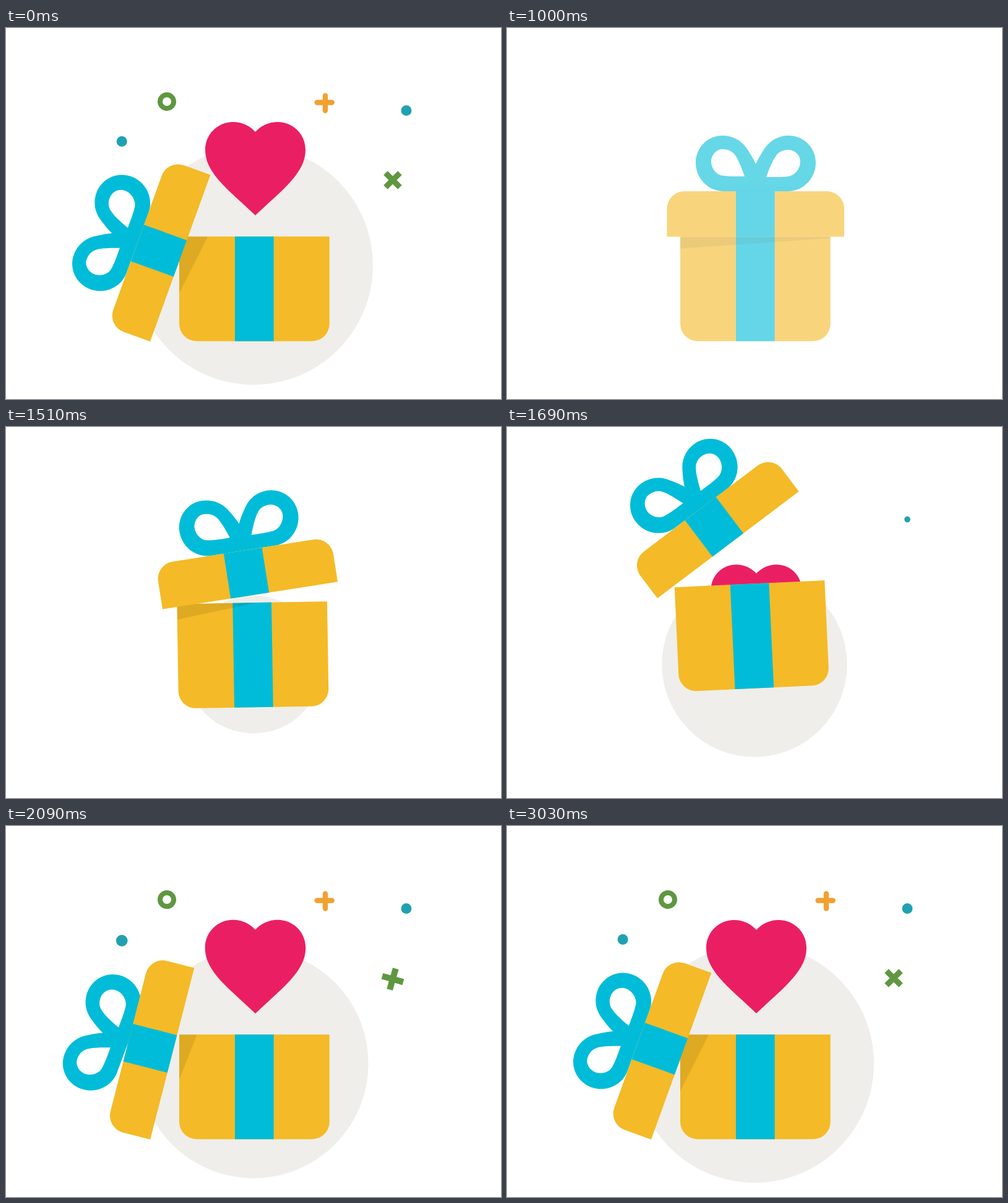
Recreate the animation shown at these times as an HTML page. Size 800 px wide and 600 px high, loop 3630 ms.

```html
<!DOCTYPE html>
<html lang="en">
<head>
<meta charset="utf-8">
<title>Gift</title>
<style>
html, body { margin: 0; width: 100%; height: 100%; overflow: hidden; background: #fff; }
svg { display: block; width: 100%; height: 100%; }
</style>
</head>
<body>
<svg viewBox="0 0 800 600">
  <defs>
    <path id="crate" d="M280 337.3H522.7V478.5A28 28 0 0 1 494.7 506.5H308A28 28 0 0 1 280 478.5Z"/>
    <clipPath id="inside"><use href="#crate"/></clipPath>
  </defs>
  <g id="scene">
    <circle id="disc" cx="400" cy="384" fill="#efeeea"/>
    <path id="heart" fill="#ea1f63" d="M403 168C394 158 381 152 367 152C342 152 322 172 322 197C322 235 360 262 403 303C446 262 484 235 484 197C484 172 464 152 439 152C425 152 412 158 403 168Z"/>
    <g id="box">
      <use href="#crate" fill="#f4ba27"/>
      <path fill="#00bcd8" d="M370 337.3H432.7V506.5H370Z"/>
      <path id="shade" clip-path="url(#inside)" fill-opacity=".09"/>
    </g>
    <circle id="dotL" r="8.5" fill="#20a1b2"/>
    <circle id="dotR" r="8.5" fill="#20a1b2"/>
    <circle id="ring" fill="none" stroke="#5f9741"/>
    <path id="plus" fill="none" stroke="#f0a131" stroke-width="8.4" stroke-linecap="round" d="M1 -11.5V12.5M-12.3 -.5H11.7"/>
    <path id="cross" fill="none" stroke="#5f9741" stroke-width="9.2" d="M-11.5 -11.5L11.5 11.5M11.5 -11.5L-11.5 11.5"/>
    <g id="lid">
      <path id="bow" fill="#00bcd8" fill-rule="evenodd" d="M350 264C325 264 305 243 305 218C305 193 325 174 348 174C364 174 378 181 387 194C393 203 398 211 402 220C406 211 411 203 417 194C426 181 440 174 455 174C479 174 499 193 499 218C499 243 479 264 454 264Z
        M384 240C379 226 374 213 369 206C364 199 357 196 348 196C338 196 330 206 330 216C330 227 338 237 347 238.5C358 240.5 372 240 384 240Z
        M419 241C424 227 429 215 434 208C438 201 445 197 454 197C465 197 474 205 474 216C474 227 466 238 455 240C444 241.5 431 241 419 241Z"/>
      <path fill="#f4ba27" d="M258.5 337.5V292A28 28 0 0 1 286.5 264H517A28 28 0 0 1 545 292V337.5Z"/>
      <path fill="#00bcd8" d="M370 264H432.7V337.5H370Z"/>
    </g>
  </g>
</svg>
<script>
const LOOP = 3630, OPEN = 1150, END = 3030;
const JUMP = 1430, APEX = 1625, LAND = 1850;

const el = id => document.getElementById(id);
const set = (id, name, value) => el(id).setAttribute(name, value);
const clamp = x => Math.min(1, Math.max(0, x));
const part = (t, start, length) => clamp((t - start) / length);
const smooth = u => u * u * (3 - 2 * u);
const arc = u => Math.sin(Math.PI * u);
const backOut = (u, c) => 1 - (c + 1) * (1 - u) ** 3 + c * (1 - u) ** 2;
const tan = deg => Math.tan(deg * Math.PI / 180);

// Rises to 1 after `rise` ms, then dies away slowly.
function swing(t, start, rise) {
  const k = Math.max(0, t - start) / rise;
  return (k * Math.exp(1 - k)) ** 2;
}

function lidPose(t) {
  const lean = 70.1 * part(t, JUMP, 440) ** 1.21 + 5.8 * swing(t, 1780, 250);
  const rising = t < APEX;
  const fall = 263 + (rising ? .0024 : .0033) * (t - APEX) ** 2;
  return {
    lean, rising,
    x: 233 + 25.5 * (1 - part(t, JUMP, 700)) ** 2,
    y: Math.min(rising ? 337.5 : 507, fall)
  };
}

function drawShade(lid) {
  let w, d;
  if (lid.rising) {
    d = Math.max(0, 19.5 + 1.2 * lid.lean * (1 - lid.lean / 20));
    w = d / tan(4 + .8 * lid.lean);
  } else {
    // Runs beside the lid's edge where that meets the top of the box.
    w = Math.max(0, lid.x + (lid.y - 337.3) / tan(lid.lean) + 32 - 280);
    d = w * tan(lid.lean - 7);
  }
  set("shade", "d", `M280 337.3h${w}L280 ${337.3 + d}Z`);
}

function drawGift(t) {
  const press = 1 - .065 * arc(part(t, OPEN, 290));
  const thud = arc(part(t, LAND - 10, 110));
  const hop = part(t, JUMP, LAND - JUMP);
  const lift = hop * (1 - hop);
  const tilt = -3.2 * Math.sin(hop * Math.PI / 2) * (1 - smooth(part(t, LAND, 150)));
  set("box", "transform", `translate(${280 - 6 * lift} ${506.5 - 332 * lift + 1.6 * thud})
    rotate(${tilt}) scale(1 ${press - .049 * thud}) translate(-280 -506.5)`);

  const lid = lidPose(t);
  set("lid", "transform", `translate(0 506.5) scale(1 ${press}) translate(0 -506.5)
    translate(${lid.x} ${lid.y}) rotate(${-lid.lean}) translate(-258.5 -337.5)`);
  set("bow", "transform", `rotate(${6.5 * swing(t, 1660, 320)} 401.5 264)`);
  drawShade(lid);
}

function drawHeart(t) {
  const u = part(t, 1500, 620);
  const beat = arc(part(t, 2310, 720)) ** 2;
  const size = backOut(u, 1.62) * (1 + .055 * beat);
  set("heart", "transform", `translate(403 ${227.3 + 190 * (1 - u) ** 3}) scale(${size}) translate(-403 -227.3)`);
}

function drawBit(t, id, x, y, start) {
  const u = part(t, start, 300);
  const size = backOut(u, 2);
  const turn = id === "cross" ? -90 * (1 - part(t, start, 700)) ** 3 : 0;
  set(id, "transform", `translate(${x} ${y + 21.6 * (1 - u) ** 2}) rotate(${turn}) scale(${size})`);
  if (id === "ring") {
    const hole = 7 * part(t, start + 60, 120);
    set(id, "r", (15 + hole) / 2);
    set(id, "stroke-width", 15 - hole);
  }
}

function render(ms) {
  const level = start => .2 * (Math.floor((ms - start) / 50) + 1);
  let t = END, alpha = 1;
  if (ms < 700) {
    alpha = 1 - clamp(level(500));
  } else if (ms < OPEN) {
    t = OPEN;
    alpha = clamp(level(900));
  } else {
    t = Math.min(END, OPEN + Math.floor((ms - OPEN) / 20) * 20);
  }
  set("scene", "opacity", alpha);
  set("disc", "r", 193 * (1 - (1 - part(t, 1224, 1806)) ** 5));
  drawGift(t);
  drawHeart(t);
  drawBit(t, "dotR", 647, 133.5, 1648);
  drawBit(t, "plus", 515, 121, 1738);
  drawBit(t, "ring", 260, 119, 1798);
  drawBit(t, "cross", 625, 246, 1870);
  drawBit(t, "dotL", 187.2, 183.5, 1880);
}

const begin = performance.now();
function tick() {
  render((performance.now() - begin) % LOOP);
  requestAnimationFrame(tick);
}
tick();
</script>
</body>
</html>
```
